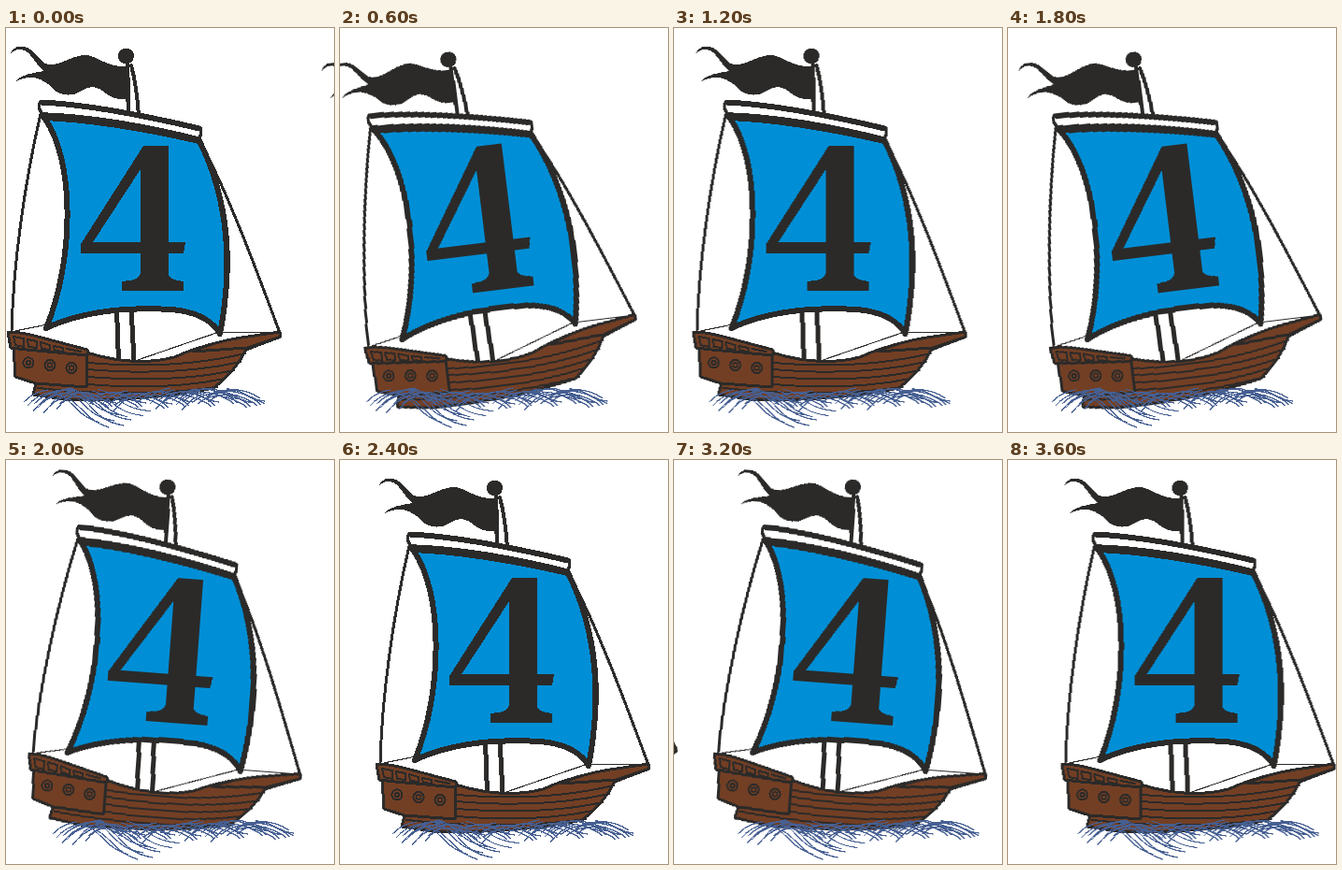
Animation of 351x432 px, one loop 3800 ms. Source, as an HTML page without scripts:

```html
<!DOCTYPE html>
<html lang="en">
<head>
<meta charset="utf-8">
<title>Ship number 4</title>
<style>
  html, body { margin: 0; width: 100%; height: 100%; overflow: hidden; background: #fff; }
  svg { display: block; width: 100vw; height: 100vh; shape-rendering: crispEdges; }

  :root { --ink: #2b2a29; --blue: #008fd6; --wood: #733f24; --sea: #465f92; }
  .ink { fill: var(--ink); }
  .line { fill: none; stroke: var(--ink); stroke-linecap: round; stroke-linejoin: round; }
  .wood { fill: var(--wood); stroke: var(--ink); stroke-width: 3; stroke-linejoin: round; }
  .sea { fill: none; stroke: var(--sea); stroke-width: 1.3; stroke-linecap: round; }

  .drift { animation: drift 3.8s steps(19) infinite; }
  .rock { transform-origin: 148px 210px; animation: rock 3.8s step-end infinite; }
  .ahead { animation-delay: -.2s; }
  .behind { animation-delay: -3.6s; }

  @keyframes drift { to { transform: translateX(58.6px); } }

  /* six poses of 200 ms, three times over, then the first pose again */
  @keyframes rock {
    0%, 31.578%, 63.157%, 94.736%, 100% { transform: rotate(0deg); }
    5.263%, 36.842%, 68.421% { transform: rotate(-7deg); }
    10.526%, 42.105%, 73.684% { transform: rotate(-12.8deg); }
    15.789%, 47.368%, 78.947% { transform: rotate(-7deg); }
    21.052%, 52.631%, 84.21% { transform: rotate(4.3deg); }
    26.315%, 57.894%, 89.473% { transform: rotate(11deg); }
  }
</style>
</head>
<body>
<svg viewBox="0 0 351 432" role="img" aria-label="A sailing ship with the number 4 on its sail">
  <defs>
    <g id="port">
      <circle r="5.6" class="line" stroke-width="2"/>
      <circle r="2.4" class="line" stroke-width="1.6"/>
    </g>

    <g id="ship">
      <!-- mast and flag -->
      <path class="line" stroke-width="4.5" d="M130 38L131 92"/>
      <path class="line" stroke-width="5" d="M118.500 300L120.500 356M134 298L137 356"/>
      <path class="line" stroke-width="4" d="M134 40Q140 62 142 94"/>
      <path class="ink" d="M4 29Q7 20 16 19.500C30 20 34 34 42 38C56 43 66 31 82 29C98 28 106 43 131 41L133 75C122 78 114 75 107 70C98 62 90 61 81 67C72 73 62 73 54 68C47 61 40 55 30 53Q20 52 9 58C16 49 30 48 41 46C30 38 27 25 17 23Q9 22 4 29Z"/>
      <circle class="ink" cx="128.500" cy="30" r="8.500"/>

      <!-- rigging -->
      <path class="line" stroke-width="3" d="M37 92C20 165 8 250 6 324M207 120C236 172 270 264 293 326"/>
      <path class="line" stroke-width="1.100" d="M44 317L5 325M138 356L228 325L293 326"/>

      <!-- sail -->
      <path d="M41 96C90 98 150 108 207 121C232 170 246 240 229 327C212 298 170 299 126 301Q76 305 43 321C73 248 74 142 41 96Z" fill="var(--blue)" stroke="var(--ink)" stroke-width="6" stroke-linejoin="round"/>
      <path class="line" stroke-width="4" d="M209 124C234 174 247 240 230 324"/>
      <path class="ink" fill-rule="evenodd" d="M147 126H173.500V229H192L190 241H173.500V260Q173.500 269 184 270L190 271V281H124V271L132 270Q144 269 144 260V241H80V231ZM144 151L93 229H144Z"/>

      <!-- yard -->
      <path d="M37 79C90 82 150 95 208 108Q210 114 206 118C150 104 95 94 39 92Q33 86 37 79Z" fill="#fff" stroke="var(--ink)" stroke-width="3.600" stroke-linejoin="round"/>
      <path class="line" stroke-width="6" d="M38 79.500C90 82 150 94 207 107.500"/>

      <!-- hull -->
      <path class="wood" d="M86 347Q138 363 180 352Q205 341 229 336L293 326L294 330L257 344Q244 369 222 385Q150 400 62 397L29 392L32 380L60 372Z"/>
      <path class="line" stroke-width="2" d="M87 358Q180 366 256 348M87 365Q180 373 251 357M87 373Q180 380 244 366M87 381Q170 388 234 375M34 385Q140 396 226 384"/>
      <path class="wood" d="M200 346Q220 336 252 331L293 325L294 330L258 342Z" stroke-width="2.500"/>
      <path class="wood" d="M8 340L86 348V384L32 380L10 373Z"/>
      <path class="wood" d="M2 325Q16 325 34 330L87 344V350L22 344L5 342Z" stroke-width="3.500"/>
      <path class="line" stroke-width="2" d="M8 330L19 332V341L10 339ZM23 333L33 335V342L24 341ZM37 336L47 339V344L38 343ZM51 340L61 342V346L52 345ZM65 343L80 346"/>
      <use href="#port" x="24" y="358"/>
      <use href="#port" x="47" y="360.500"/>
      <use href="#port" x="70" y="363.500"/>
    </g>

    <path id="crest" d="M0 12Q16-1 34 3T62 17M5 14Q20 2 36 7T58 18M14 6Q30-3 44 5T66 13"/>
    <path id="sweep" d="M0 0C20 4 20 28 54 33M7-2C28 4 28 23 62 27M-6 4C8 10 14 28 38 35"/>
    <path id="spray" d="M0 14Q10 3 26 1M4 18Q14 6 30 3M10 24Q20 10 36 5"/>

    <g id="waves" class="sea">
      <use href="#spray" x="19" y="386"/>
      <use href="#spray" x="30" y="388"/>
      <use href="#spray" x="44" y="384"/>
      <use href="#crest" x="36" y="385"/>
      <use href="#crest" x="52" y="388"/>
      <use href="#sweep" x="62" y="387"/>
      <use href="#sweep" x="72" y="392"/>
      <use href="#sweep" transform="translate(92 388) scale(1 .8)"/>
      <use href="#crest" x="84" y="388"/>
      <use href="#spray" x="104" y="387"/>
      <use href="#crest" x="112" y="389"/>
      <use href="#crest" x="134" y="387"/>
      <use href="#spray" x="150" y="384"/>
      <use href="#crest" x="162" y="387"/>
      <use href="#spray" x="178" y="385"/>
      <use href="#crest" x="186" y="384"/>
      <use href="#crest" x="200" y="388"/>
      <use href="#crest" x="211" y="386"/>
      <path d="M222 389Q246 384 277 402M236 386Q258 386 272 396"/>
    </g>
  </defs>

  <g class="drift">
    <g transform="translate(-354)">
      <g class="rock behind"><use href="#ship"/></g>
      <use href="#waves"/>
    </g>
    <g>
      <g class="rock"><use href="#ship"/></g>
      <use href="#waves"/>
    </g>
    <g transform="translate(354)">
      <g class="rock ahead"><use href="#ship"/></g>
      <use href="#waves"/>
    </g>
  </g>
</svg>
</body>
</html>
```
